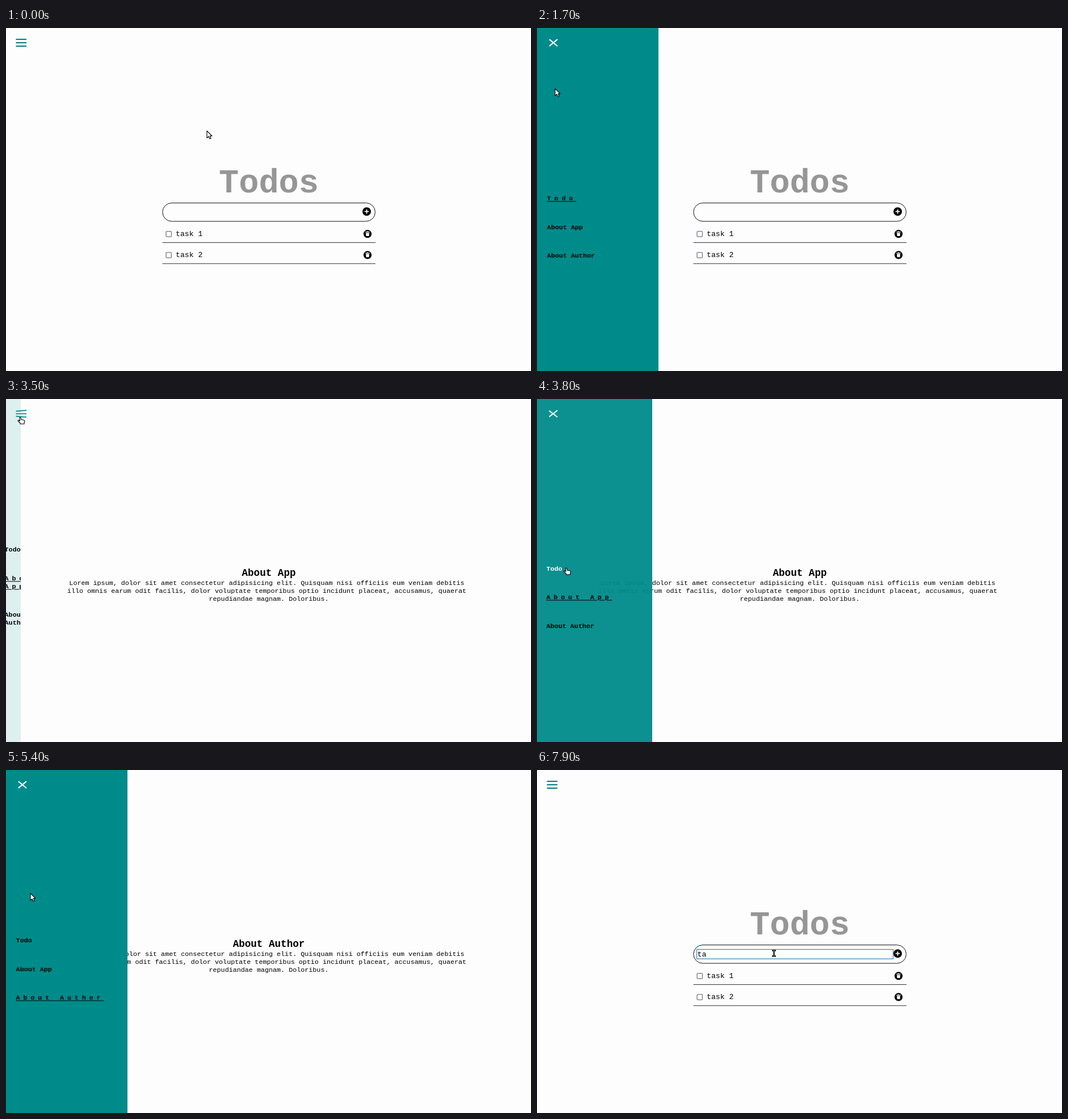
Animation of 925 by 605 pixels, one loop 8 s. Source, as an HTML page:

```html
<!DOCTYPE html>
<html lang="en">
<head>
<meta charset="utf-8">
<title>Todos</title>
<style>
  html, body { margin: 0; width: 100%; height: 100%; overflow: hidden; background: #fdfdfd; }
  body { font-family: "Liberation Mono", "Courier New", monospace; color: #000; }
  svg { position: absolute; left: 0; top: 0; width: 925px; height: 605px; }
  nav { position: absolute; left: 0; top: 0; height: 605px; overflow: hidden; }
  ul { position: absolute; margin: 0; padding: 0; width: 100%; list-style: none; transform: translateY(-50%); font: bold 11.73px/14.08px "Liberation Mono", "Courier New", monospace; }
  li + li { margin-top: 36.5px; }
  .active { letter-spacing: .5em; text-decoration: underline; }
  .hover { color: #fff; }
  .title { font-size: 58.67px; font-weight: bold; fill: #969696; }
  .task, #typed { font-size: 13.2px; }
  .about { font-size: 11.73px; }
  .about .head { font-size: 17.6px; font-weight: bold; }
  .mid { text-anchor: middle; }
  #burger line { stroke-width: 2.1; }
  #pointer path { fill: #fff; stroke: #000; stroke-width: 1.1; stroke-linejoin: round; }
</style>
</head>
<body>
<svg viewBox="0 0 925 605">
  <defs>
    <g id="row">
      <rect x="282" y="358.7" width="9.4" height="9.4" rx="1.3" fill="#fff" stroke="#77757f" stroke-width="1.3"/>
      <circle cx="637" cy="363.2" r="7.1"/>
      <path d="M633.2 359.2h2.4l.6-.7h1.6l.6.7h2.4v1.3h-7.6zM634 361.4h6l-.5 5.6h-5z" fill="#fff"/>
      <path d="M275.5 378.5H651" stroke="#333"/>
    </g>
  </defs>
  <g id="todos">
    <text class="title mid" x="463" y="290">Todos</text>
    <rect x="275.8" y="308.6" width="374.7" height="32.4" rx="16.2" fill="none" stroke="#111"/>
    <rect id="focus" x="281.5" y="316.5" width="346" height="16.6" fill="none" stroke="#3c8fc6" stroke-width="1.3"/>
    <text id="typed" x="282.5" y="328.5"></text>
    <circle cx="635.5" cy="323.7" r="7.5"/>
    <path d="M631.7 323.7h7.6M635.5 319.9v7.6" stroke="#fff" stroke-width="1.7"/>
    <use href="#row"/>
    <use href="#row" y="37.2"/>
    <text class="task" x="299" y="366.6">task 1</text>
    <text class="task" x="299" y="403.8">task 2</text>
  </g>
  <g id="about" class="about mid">
    <text id="heading" class="head" x="463" y="312.3"></text>
    <text y="328.2">
      <tspan x="463">Lorem ipsum, dolor sit amet consectetur adipisicing elit. Quisquam nisi officiis eum veniam debitis</tspan>
      <tspan x="463" dy="14.08">illo omnis earum odit facilis, dolor voluptate temporibus optio incidunt placeat, accusamus, quaerat</tspan>
      <tspan x="463" dy="14.08">repudiandae magnam. Doloribus.</tspan>
    </text>
  </g>
</svg>
<nav id="nav"><ul id="menu"><li>Todo</li><li>About App</li><li>About Author</li></ul></nav>
<svg viewBox="0 0 925 605">
  <g id="burger">
    <line x1="17.5" y1="20" x2="36" y2="20"/>
    <line x1="17.5" y1="26" x2="36" y2="26"/>
    <line x1="17.5" y1="32" x2="36" y2="32"/>
  </g>
  <g id="pointer">
    <path id="arrow" d="M0 .5V13L3 10.3L5.1 14.4L7.2 13.4L5.3 9.4H9Z"/>
    <path id="hand" d="M-1 1Q0 -.6 1.2 1L1.8 4.5L6 5Q8 5.5 8 7.5L7 10V12H0V10.5L-4 6.5Q-3.8 5 -2.2 5.5L-.5 6.8Z"/>
    <path id="beam" d="M-2.8 -5.6H2.8V-4.2H.8V4.2H2.8V5.6H-2.8V4.2H-.8V-4.2H-2.8Z"/>
  </g>
</svg>
<script>
  const $ = id => document.getElementById(id);
  const LOOP = 8000, TICK = 100, SLIDE = 500;

  // pointer path: time, x, y
  const path = [
    [100, 354, 181], [800, 12, 29], [1000, 24.5, 24], [1500, 24.5, 24],
    [2300, 54, 354], [2750, 54, 354], [3300, 25, 32], [3550, 25, 32],
    [3900, 62, 404], [4150, 62, 404], [4500, 71, 262], [4750, 25, 28],
    [5000, 25, 28], [5400, 43, 217], [5700, 34, 302], [6350, 34, 302],
    [6800, 417.5, 323.3]
  ];
  // menu toggles: time, open
  const toggles = [[1142, 1], [2660, 0], [3442, 1], [4000, 0], [4800, 1], [5850, 0]];
  const visits = [[0, 0], [2660, 1], [4000, 2], [5850, 0]];
  const items = [...$('menu').children];
  const bars = [...$('burger').children];

  // cubic-bezier(.25, .1, .25, 1)
  function ease(x) {
    if (x <= 0 || x >= 1) return x <= 0 ? 0 : 1;
    const bez = (s, a, b) => 3 * (1 - s) ** 2 * s * a + 3 * (1 - s) * s * s * b + s ** 3;
    let lo = 0, hi = 1;
    for (let i = 0; i < 24; i++) {
      const m = (lo + hi) / 2;
      if (bez(m, .25, .25) < x) lo = m; else hi = m;
    }
    return bez(lo, .1, 1);
  }

  const latest = (list, t) => list.filter(e => e[0] <= t).pop();

  function openness(t) {
    const last = latest(toggles, t);
    if (!last) return 0;
    const e = ease((t - last[0]) / SLIDE);
    return last[1] ? e : 1 - e;
  }

  function pointerAt(t) {
    const a = latest(path, t) || path[0];
    const b = path[path.indexOf(a) + 1];
    if (!b || t <= a[0]) return [a[1], a[2]];
    const k = (t - a[0]) / (b[0] - a[0]);
    return [a[1] + (b[1] - a[1]) * k, a[2] + (b[2] - a[2]) * k];
  }

  const show = (id, on) => { $(id).style.display = on ? '' : 'none'; };

  function drawMenu(p, page, hover) {
    $('nav').style.width = 214 * p + 'px';
    $('nav').style.background = `rgba(0,139,139,${p})`;
    $('menu').style.left = 22.8 * p - 5.2 + 'px';
    $('menu').style.top = 328.3 + 23.7 * p + 'px';
    items.forEach((li, i) => {
      li.classList.toggle('active', i === page);
      li.classList.toggle('hover', i === hover);
    });
    const g = 128 + 127 * p;
    $('burger').style.stroke = `rgb(${255 * p},${g},${g})`;
    bars[0].setAttribute('transform', `rotate(${-40 * p} 36 20)`);
    bars[1].style.opacity = 1 - p;
    bars[2].setAttribute('transform', `rotate(${40 * p} 36 32)`);
  }

  function draw(t) {
    const p = openness(t), page = latest(visits, t)[1], [x, y] = pointerAt(t);
    const over = p > .5 && x > 17 && x < 110 ? [301, 352, 402].findIndex(c => Math.abs(y - c) < 7) : -1;
    drawMenu(p, page, over);

    show('todos', page === 0);
    show('about', page > 0);
    $('heading').textContent = items[page].textContent;
    show('focus', t >= 6850);
    $('typed').textContent = 'ta'.slice(0, Math.max(0, Math.floor((t - 7700) / 100)));

    const onBurger = x > 17 && x < 37 && y > 18 && y < 34;
    const kind = over >= 0 || onBurger ? 'hand'
      : page === 0 && x > 281 && x < 628 && y > 316 && y < 333 ? 'beam' : 'arrow';
    ['arrow', 'hand', 'beam'].forEach(id => show(id, id === kind));
    $('pointer').setAttribute('transform', `translate(${x} ${y})`);
  }

  const start = performance.now();
  function loop() {
    const t = (performance.now() - start) % LOOP;
    draw(Math.floor(t / TICK) * TICK);
    requestAnimationFrame(loop);
  }
  loop();
</script>
</body>
</html>
```
